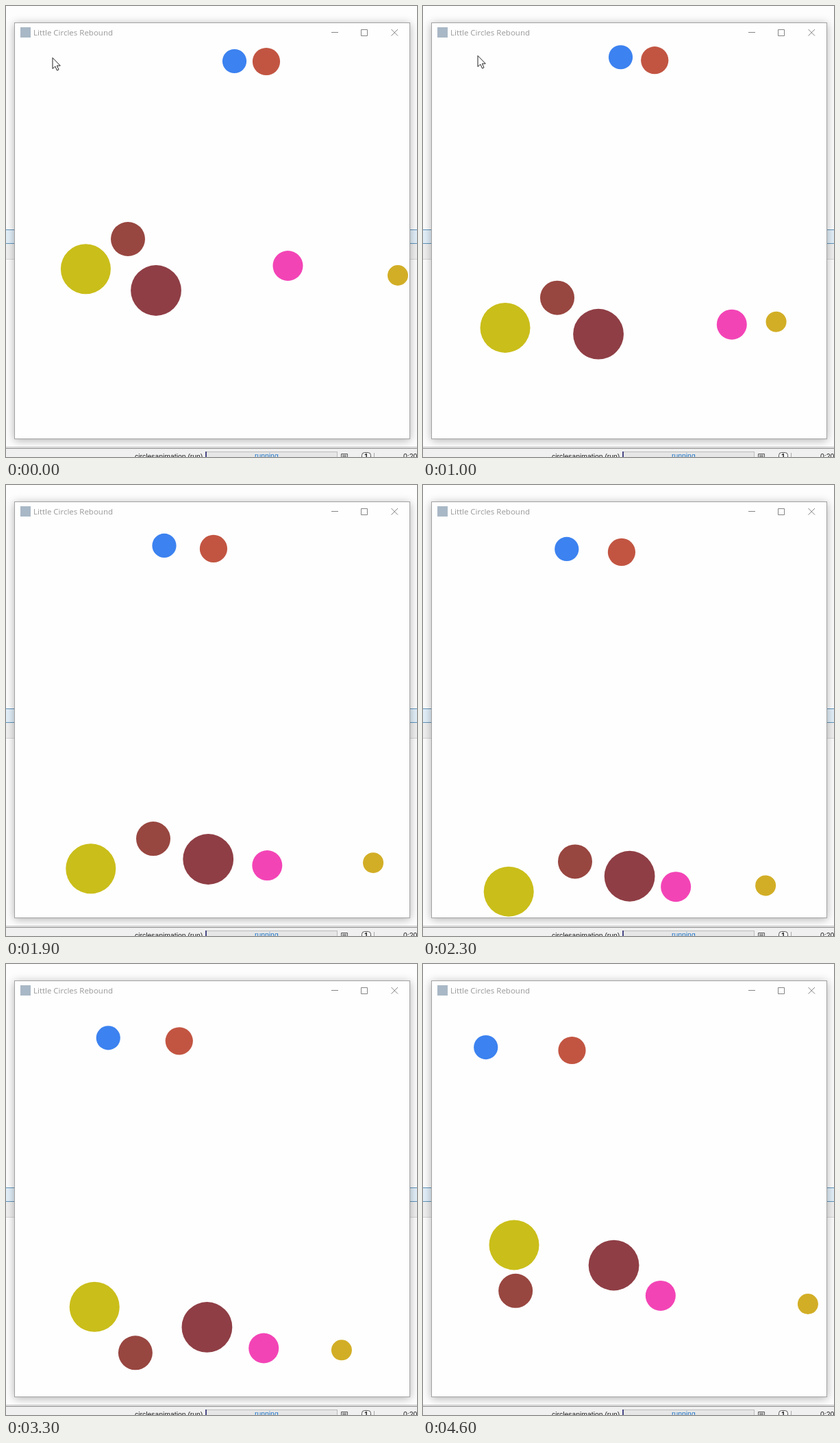
Animation, 600 px wide and 658 px high, one loop 4700 ms. Source, as an HTML page:

```html
<!DOCTYPE html>
<html lang="en">
<head>
<meta charset="utf-8">
<title>Little Circles Rebound</title>
<style>
  html, body { margin: 0; width: 100%; height: 100%; overflow: hidden; background: #fdfdfd; }
  #stage { position: absolute; left: 0; top: 0; width: 600px; height: 658px; overflow: hidden; }
  #stage > * { position: absolute; box-sizing: border-box; }
  .band { left: 0; width: 600px; }
  #tabs { top: 326px; height: 21px; background: #e2eff9; border: solid #5d93bb; border-width: 1px 0; }
  #tools { top: 347px; height: 23px; background: #f0f0f0; border-bottom: 1px solid #d6d6d6; }
  #status { top: 643px; height: 15px; background: #f0f0f0; border-top: 1px solid #c4c4c4; }
  #window {
    left: 12px; top: 24px; width: 578px; height: 608px;
    background: #fefefe; border: 1px solid #a2a2a2;
    box-shadow: 0 2px 12px rgba(0, 0, 0, .3);
  }
  svg { left: 0; top: 0; }
  .title { font: 11.5px "Open Sans", "Noto Sans", sans-serif; fill: #999; }
  .small { font: 10.4px "Liberation Sans", Arial, sans-serif; fill: #222; }
</style>
</head>
<body>
<div id="stage">
  <div class="band" id="tabs"></div>
  <div class="band" id="tools"></div>
  <div class="band" id="status"></div>
  <div id="window"></div>
  <svg width="600" height="658" viewBox="0 0 600 658">
    <rect x="21" y="31" width="15" height="15" fill="#a9b8c6"/>
    <text class="title" x="40" y="43">Little Circles Rebound</text>
    <g fill="none" stroke="#858585">
      <path d="M475 38.5H485M518.5 34.5H527.5V43.5H518.5Z"/>
      <path d="M562.5 34L572 43.5M572 34L562.5 43.5"/>
    </g>

    <path d="M0 645.5H600" stroke="#8c8c8c"/>
    <text class="small" x="188" y="661">circlesanimation (run)</text>
    <rect x="292.5" y="650.5" width="191" height="12" fill="#e6e6e6" stroke="#bcbcbc"/>
    <path d="M292 650V658" stroke="#4b4a86" stroke-width="2"/>
    <text class="small" x="363" y="660" style="fill:#2377c8">running</text>
    <path d="M489.5 658V653.5H498.5V658M491 655.5H497M491 657.5H497" fill="none" stroke="#555"/>
    <rect x="519.5" y="651.5" width="13" height="12" rx="4" fill="#f7f7f7" stroke="#555"/>
    <text class="small" x="523" y="661" style="font-weight:bold">1</text>
    <path d="M537.5 652V658" stroke="#aaa"/>
    <text class="small" x="580" y="661">0:20</text>

    <g id="discs"></g>
    <path id="cursor" d="M0 0V16L3.8 12.5L6.5 18.5L9 17.3L6.4 11.6H11.3Z" fill="#fff" stroke="#222"/>
  </svg>
</div>
<script>
const LOOP = 4700, FRAME = 100, SUBSTEPS = 8, CURSOR_GONE = 1300;
const LEFT = 13, RIGHT = 589.3, TOP = 53.6, FLOOR = 630.7;

// The simulation runs unevenly: ticks done by each time in ms
const pace = [[0, 0], [1000, 18], [1500, 29], [2300, 44], [3300, 64], [4000, 73], [4600, 83]];

// Starting state; speeds in pixels per tick, mass equals radius
const start = [
  { r: 17.6, x: 333.5, y: 80.5, vx: -1.78, vy: -0.72, fill: '#3c82f0' },
  { r: 20.1, x: 380, y: 81, vx: -2.95, vy: -0.72, fill: '#c25542' },
  { r: 36.5, x: 116.4, y: 383.7, vx: 0.2, vy: 4.76, fill: '#cabe1a' },
  { r: 25, x: 178, y: 340, vx: 1, vy: 4.76, fill: '#984640' },
  { r: 36.9, x: 219, y: 415, vx: 2.06, vy: 3.54, fill: '#8f3e45' },
  { r: 22, x: 411.5, y: 379, vx: 3.47, vy: 4.76, fill: '#f344b6' },
  { r: 15, x: 572, y: 393, vx: 5.32, vy: 3.54, fill: '#d2ae26' }
];

function move(d) {
  d.x += d.vx / SUBSTEPS;
  d.y += d.vy / SUBSTEPS;
  if (d.x - d.r < LEFT) d.vx = Math.abs(d.vx);
  if (d.x + d.r > RIGHT) d.vx = -Math.abs(d.vx);
  if (d.y - d.r < TOP) d.vy = Math.abs(d.vy);
  if (d.y + d.r > FLOOR) d.vy = -Math.abs(d.vy);
}

// Elastic along x; along y the second disc takes over the first one's speed
function collide(a, b) {
  const dx = b.x - a.x;
  const touching = Math.hypot(dx, b.y - a.y) < a.r + b.r;
  if (!touching || dx * (b.vx - a.vx) >= 0) return;
  const mean = (a.r * a.vx + b.r * b.vx) / (a.r + b.r);
  a.vx = 2 * mean - a.vx;
  b.vx = 2 * mean - b.vx;
  b.vy = a.vy;
}

function simulate(ticks) {
  const discs = start.map(d => ({ ...d }));
  for (let n = 0; n < ticks * SUBSTEPS; n++) {
    discs.forEach(move);
    discs.forEach((a, i) => discs.slice(i + 1).forEach(b => collide(a, b)));
  }
  return discs;
}

function ticksAt(t) {
  const i = Math.max(1, pace.findIndex(p => p[0] >= t));
  const [t0, n0] = pace[i - 1], [t1, n1] = pace[i];
  return Math.round(n0 + (n1 - n0) * (t - t0) / (t1 - t0));
}

const layer = document.getElementById('discs');
const cursor = document.getElementById('cursor');
const nodes = start.map(d => {
  const node = document.createElementNS(layer.namespaceURI, 'circle');
  node.setAttribute('r', d.r);
  node.setAttribute('fill', d.fill);
  return layer.appendChild(node);
});

let shown = -1;
function draw() {
  requestAnimationFrame(draw);
  const t = Math.floor(performance.now() % LOOP / FRAME) * FRAME;
  if (t === shown) return;
  shown = t;
  simulate(ticksAt(t)).forEach((d, i) => {
    nodes[i].setAttribute('cx', d.x);
    nodes[i].setAttribute('cy', d.y);
  });
  cursor.setAttribute('transform', `translate(${68 + 0.012 * t} ${75.5 - 0.003 * t})`);
  cursor.setAttribute('visibility', t < CURSOR_GONE ? 'visible' : 'hidden');
}
draw();
</script>
</body>
</html>
```
